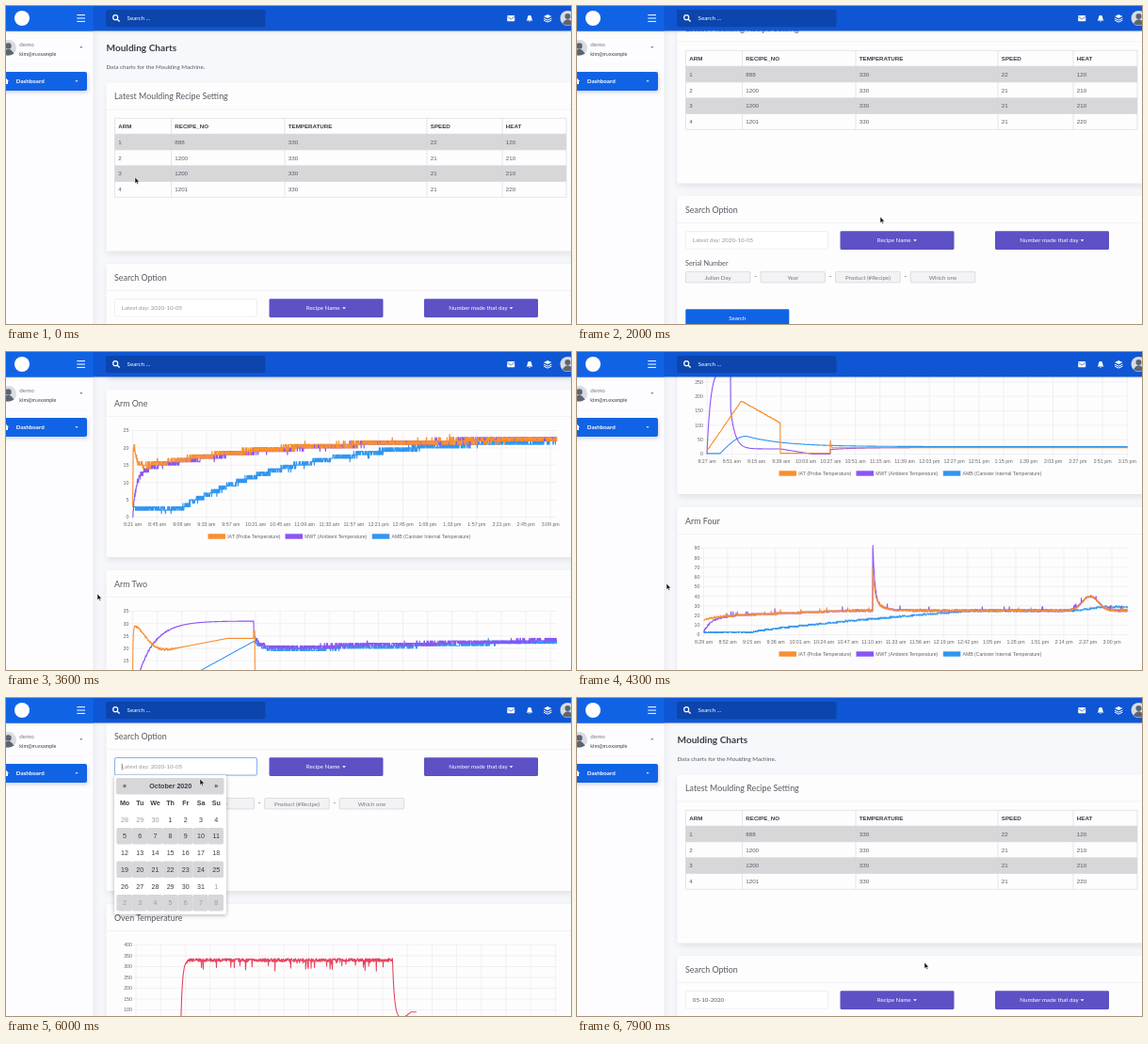
Animation of 600 by 338 pixels, one loop 8000 ms. Source, as an HTML page:

```html
<!DOCTYPE html>
<html lang="en">
<head>
<meta charset="utf-8">
<title>Moulding Charts</title>
<style>
html, body { margin: 0; width: 100%; height: 100%; overflow: hidden; background: #f7f8fb; }
svg { display: block; width: 600px; height: 338px; }
text { font-family: Lato, sans-serif; white-space: pre; }
.arial { font-family: "Liberation Sans", Arial, sans-serif; }
.bold { font-weight: 700; }
.mid { text-anchor: middle; }
.end { text-anchor: end; }
.card { fill: #fefdfe; filter: drop-shadow(1px 3px 3.5px rgba(69, 65, 78, .12)); }
.pop { fill: #fff; filter: drop-shadow(0 1px 2px rgba(0, 0, 0, .3)); }
.glow { filter: drop-shadow(1px 2px 2px rgba(69, 65, 78, .22)); }
.side { fill: #fdfcff; filter: drop-shadow(1px 1px 3px rgba(69, 65, 78, .1)); }
.bar { filter: drop-shadow(0 1px 1.5px rgba(0, 0, 0, .1)); }

#page, #cursor, .open, .blank, .picked { animation: 8s infinite; }
#page { animation-name: scroll; }
#cursor { animation-name: point; }
.open, .blank, .picked { animation-timing-function: step-end; }
.open { animation-name: open; }
.blank { animation-name: blank; }
.picked { animation-name: picked; }

/* One step per 100 ms */
@keyframes scroll {
  0% { transform: translateY(0); }
  16.25% { transform: translateY(0); animation-timing-function: steps(7); }
  25% { transform: translateY(-72px); animation-timing-function: steps(16); }
  45% { transform: translateY(-619px); animation-timing-function: steps(7); }
  53.75% { transform: translateY(-1070px); }
  57.5% { transform: translateY(-1070px); animation-timing-function: steps(8); }
  67.5% { transform: translateY(-248px); }
  82.5% { transform: translateY(-248px); animation-timing-function: steps(6); }
  90% { transform: translateY(-11px); animation-timing-function: steps(1); }
  91.25%, 100% { transform: translateY(0); }
}
@keyframes point {
  0%, 5% { transform: translate(137px, 182px); animation-timing-function: steps(9); }
  16.25% { transform: translate(322px, 224px); }
  25% { transform: translate(322px, 224px); animation-timing-function: steps(8); }
  35% { transform: translate(97px, 257px); }
  45% { transform: translate(97px, 257px); animation-timing-function: steps(7); }
  53.75% { transform: translate(95px, 246px); }
  57.5% { transform: translate(95px, 246px); animation-timing-function: steps(8); }
  67.5% { transform: translate(195px, 74px); }
  70% { transform: translate(195px, 74px); animation-timing-function: steps(4); }
  75% { transform: translate(206px, 86px); animation-timing-function: steps(4); }
  80% { transform: translate(126px, 147px); }
  81.25% { transform: translate(126px, 147px); animation-timing-function: steps(7); }
  90% { transform: translate(357px, 216px); animation-timing-function: steps(5); }
  96.25%, 100% { transform: translate(369px, 281px); }
}
@keyframes open {
  0% { visibility: hidden; }
  70% { visibility: visible; }
  81.25%, 100% { visibility: hidden; }
}
@keyframes blank {
  0% { visibility: visible; }
  81.25%, 100% { visibility: hidden; }
}
@keyframes picked {
  0% { visibility: hidden; }
  81.25%, 100% { visibility: visible; }
}
</style>
</head>
<body>
<svg viewBox="0 0 600 338">
  <g id="page"></g>
  <g id="frame"></g>
  <path id="cursor" d="M0 0V6.6L1.5 5.3L2.5 7.5L3.6 7L2.6 4.9H4.6Z" fill="#111" stroke="#fff" stroke-width=".5"/>
</svg>
<script>
const BLUE = '#1163e6', PURPLE = '#5d51c5', INK = '#575962', DARK = '#3a3c44', STRIPE = '#d7d6d9';
const ORANGE = '#f98f2f', VIOLET = '#8a55f5', SKY = '#3296ee', RED = '#e6455f';

let seed = 7;
const rnd = () => (seed = (seed * 16807) % 2147483647) / 2147483647;

// y is the middle of the capitals
const text = (x, y, str, size = 6.2, cls = '', fill = INK) =>
  `<text x="${x}" y="${y + size * .36}" font-size="${size}" class="${cls}" fill="${fill}">${str}</text>`;
const rect = (x, y, w, h, fill, extra = '') =>
  `<rect x="${x}" y="${y}" width="${w}" height="${h}" fill="${fill}" ${extra}/>`;
const line = (d, color = '#e6e5ea', w = .5, extra = '') =>
  `<path d="${d}" fill="none" stroke="${color}" stroke-width="${w}" ${extra}/>`;
const caret = (x, y, fill = '#fff', r = 1.9) => `<path d="M${x - r} ${y - r / 2}h${r * 2}l${-r} ${r}z" fill="${fill}"/>`;
const card = (y, h, title) =>
  `<rect class="card" x="106.5" y="${y}" width="498" height="${h}" rx="2"/>` +
  line(`M106.5 ${y + 28.5}H605`) + text(115, y + 14.5, title, 8.9);

function recipeTable() {
  const cols = [115.5, 175.5, 296, 447, 527, 595], top = 119.3, h = 16.8;
  const rows = [
    ['ARM', 'RECIPE_NO', 'TEMPERATURE', 'SPEED', 'HEAT'],
    [1, 888, 330, 22, 120], [2, 1200, 330, 21, 210],
    [3, 1200, 330, 21, 210], [4, 1201, 330, 21, 220]
  ];
  let out = '', grid = '';
  rows.forEach((row, r) => {
    const y = top + r * h;
    if (r % 2) out += rect(cols[0], y, 479.5, h, STRIPE);
    row.forEach((v, c) => out += text(cols[c] + 3.8, y + h / 2, v, 6.2, r ? 'arial' : 'arial bold', r ? INK : DARK));
  });
  for (let r = 0; r <= 5; r++) grid += `M115.5 ${top + r * h}H595`;
  cols.forEach(x => grid += `M${x} ${top}V${top + 5 * h}`);
  return out + line(grid, '#d5d4d9', .6);
}

function dropButton(x, label, mid, tip) {
  return rect(x, 311.3, 121, 19.6, PURPLE, 'rx="1.3"') + text(mid, 321.2, label, 6.2, 'mid', '#fff') + caret(tip, 321.2);
}

function searchForm() {
  let out = card(274, 179, 'Search Option') +
    rect(115.5, 311.5, 151, 18.6, '#fff', 'rx="1.5" stroke="#e4e4ea" stroke-width=".6"') +
    rect(115.5, 311.5, 151, 18.6, 'none', 'class="open" rx="1.5" stroke="#6f9fe8" stroke-width=".8"') +
    text(122.8, 321.2, 'Latest day: 2020-10-05', 6.2, 'blank', '#96969d') +
    line('M123.2 317.5V325', '#444', .5, 'class="open"') +
    text(122.8, 321.2, '05-10-2020', 6.2, 'picked') +
    dropButton(279.5, 'Recipe Name', 336.7, 359) +
    dropButton(444, 'Number made that day', 501.5, 536.5) +
    text(115, 345.2, 'Serial Number', 7.3);
  ['Julian Day', 'Year', 'Product (#Recipe)', 'Which one'].forEach((label, i) => {
    const x = 115.4 + i * 79.6;
    out += rect(x, 354.4, 68.6, 11.6, '#f3f2f4', 'rx="1" stroke="#cbcad0" stroke-width=".6"') +
      text(x + 34.3, 360.4, label, 6.2, 'mid', '#77777e');
    if (i) out += text(x - 5.5, 359.8, '-', 7, 'mid');
  });
  return out + rect(115.3, 394.3, 110, 19, BLUE, 'rx="1.3"') + text(170.3, 403.4, 'Search', 6.2, 'mid', '#fff');
}

function calendar() {
  const top = 330, pitch = 17.7, colX = c => 126 + c * 16.2;
  const head = (x, y, s) => text(x, top + y, s, 7.1, 'arial bold mid', DARK);
  let out = `<rect class="pop" x="115" y="${top}" width="119" height="148" rx="1.5"/>` +
    rect(117, top + 3, 114.5, 17.5, STRIPE, 'rx="1.8"') +
    head(126, 11.7, '«') + head(174.7, 11.7, 'October 2020') + head(223.2, 11.7, '»');
  ['Mo', 'Tu', 'We', 'Th', 'Fr', 'Sa', 'Su'].forEach((d, c) => out += head(colX(c), 29.4, d));
  for (let i = 0; i < 42; i++) {
    const r = Math.floor(i / 7), c = i % 7, n = i - 2;
    const y = top + 47.2 + r * pitch, inside = n > 0 && n < 32;
    if (r % 2) out += rect(colX(c) - 8.6, y - 8.8, 16.4, 17.5, STRIPE, 'rx="1.8"');
    out += text(colX(c), y, n < 1 ? n + 30 : n > 31 ? n - 31 : n, 7.1, 'arial mid', inside ? DARK : '#9b9ba1');
  }
  return `<g class="open">${out}</g>`;
}

// Curve parts over x: linear rise, decay after a point, approach to 1, bell
const ramp = (x, a, b) => Math.min(1, Math.max(0, (x - a) / (b - a)));
const fade = (x, a, tau) => x < a ? 0 : Math.exp((a - x) / tau);
const reach = (x, a, tau) => x < a ? 0 : 1 - fade(x, a, tau);
const bell = (x, mid, w) => Math.exp(-(((x - mid) / w) ** 2));

// Sensors flicker between whole degrees, with a rare jump
const flicker = (v, jump = 0) =>
  Math.floor(v + (rnd() - .5) * .4) + (rnd() < .5 ? 1 : 0) + (rnd() < .015 ? jump : 0);

function trace(color, left, right, f, yOf) {
  let d = '';
  for (let x = left; x <= right; x += .3) d += `${d ? 'L' : 'M'}${x.toFixed(1)} ${yOf(f(x)).toFixed(2)}`;
  return line(d, color, 1.1, 'stroke-linejoin="round"');
}

const clock = m => `${(Math.floor(m / 60) + 11) % 12 + 1}:${String(m % 60).padStart(2, '0')} ${m < 720 ? 'am' : 'pm'}`;
const armLegend = [
  [214.5, ORANGE, 'IAT (Probe Temperature)'],
  [296.5, VIOLET, 'MWT (Ambient Temperature)'],
  [388.8, SKY, 'AMB (Canister Internal Temperature)']
];

// Lines are listed from back to front as [colour, value at x, right end]
function chart({ title, left = 134.5, gap = 26.1, max, step, start, mins = 24, legend = armLegend, lines }, i) {
  const top = 467 + i * 192, base = top + 135.5, yOf = v => base - v / max * 92;
  let grid = '', out = card(top, 178, title);
  for (let v = 0; v <= max; v += step) {
    grid += `M${left - 3.5} ${yOf(v)}H585`;
    out += text(left - 4, yOf(v), v, 5.3, 'arial end', '#666');
  }
  for (let k = 0; k < 18; k++) {
    const x = left + k * gap;
    grid += `M${x} ${top + 43.5}V${base + 3.5}`;
    out += text(x, base + 7.8, clock(start + k * mins), 5.3, 'arial mid', '#666');
  }
  out += line(grid, '#e3e2e6', .5);
  lines.forEach(([color, f, right = 585]) => out += trace(color, left, right, f, yOf));
  legend.forEach(([x, c, label]) =>
    out += rect(x, top + 153.3, 18.5, 5.4, c) + text(x + 20.7, top + 156.1, label, 5.15, 'arial', '#666'));
  return out;
}

function ovenHeat(x) {
  if (x > 410.5) return 62 + 268 * fade(x, 410.5, 2) + 28 * ramp(x, 422, 430);
  const ripple = x > 192 ? (rnd() - .5) * 16 - (rnd() < .05 ? 45 * rnd() : 0) : 0;
  return 330 * reach(x, 185.5, 1.7) + ripple;
}

// Arm four: slow warm-up, one hot spike, one late hump
const warm = (x, spike) => 20 + 5 * ramp(x, 160, 290) + spike * fade(x, 314.2, 2) +
  12 * fade(x, 314.2, 9) + 15 * bell(x, 545, 12);

const charts = [
  {
    title: 'Oven Temperature', left: 138, gap: 26.2, max: 400, step: 50, start: 501,
    legend: [[325, RED, 'Oven Temperature']],
    lines: [[RED, ovenHeat, 436]]
  },
  {
    title: 'Arm One', max: 25, step: 5, start: 501,
    lines: [
      [SKY, x => flicker(2.6 + 20.4 * reach(x, 186, 130), -1)],
      [VIOLET, x => flicker(13.2 * reach(x, 134.5, 4) + 9.6 * reach(x, 134.5, 140), -1)],
      [ORANGE, x => flicker((14 + 9 * fade(x, 135, 3)) * reach(x, 134.4, .4) + 8.7 * reach(x, 134.5, 140), 1)]
    ]
  },
  {
    title: 'Arm Two', max: 35, step: 5, start: 504,
    lines: [
      [SKY, x => x < 264 ? 3 + 20 * ramp(x, 168, 264)
        : flicker(19.3 + 3.3 * ramp(x, 290, 560) + 3.5 * fade(x, 264, 8), 1)],
      [VIOLET, x => x < 263 ? 31 * reach(x, 134.5, 18) + (rnd() - .5) * ramp(x, 190, 150)
        : flicker(20.7 + 2.6 * ramp(x, 320, 585) + 6 * fade(x, 263, 4), 1)],
      [ORANGE, x => x > 264.3 ? 0 : x > 263 ? 27
        : (19.4 + 9.5 * bell(x, 136, 16) + 4.6 * ramp(x, 172, 235)) * reach(x, 134.4, .4) + (rnd() - .5) * ramp(x, 190, 170), 266]
    ]
  },
  {
    title: 'Arm Three', left: 138, gap: 26.25, max: 300, step: 50, start: 507,
    lines: [
      [SKY, x => x < 180 ? 2 + 60 * Math.sin(ramp(x, 152, 180) * Math.PI / 2) : 26 + 36 * fade(x, 180, 40)],
      [VIOLET, x => x < 163 ? 300 * reach(x, 138, 4)
        : x < 269 ? 18 * ramp(x, 250, 216) + 140 * fade(x, 163, 5) : 23 - 7 * fade(x, 269, 30)],
      [ORANGE, x => x > 269 ? 22 + 30 * fade(x, 269, .6) : x > 216 ? 3
        : 10 + 170 * ramp(x, 138, 174) - 74 * ramp(x, 176, 216) + rnd() * 3]
    ]
  },
  {
    title: 'Arm Four', gap: 25.5, max: 90, step: 10, start: 509, mins: 23,
    lines: [
      [SKY, x => flicker(2.5 + 22.5 * ramp(x, 185, 420) ** .8 + 4 * ramp(x, 530, 560))],
      [VIOLET, x => flicker(warm(x, 56) - 17 * fade(x, 134.5, 9), 4)],
      [ORANGE, x => flicker(warm(x, 32) - 5 * fade(x, 134.5, 12), 3)]
    ]
  }
];

const person = (x, y, r) =>
  `<circle cx="${x}" cy="${y}" r="${r}" fill="#d9dce1"/><circle cx="${x}" cy="${y - r * .25}" r="${r * .38}" fill="#5d6472"/>` +
  `<path d="M${x - r * .7} ${y + r * .7}q${r * .7} ${-r * 1.1} ${r * 1.4} 0q${-r * .7} ${r * .5} ${-r * 1.4} 0z" fill="#5d6472"/>`;

function topBar() {
  return `<g class="bar">${rect(0, 0, 600, 26.5, '#0f56d5') + rect(0, 0, 92.5, 26.5, BLUE)}</g>` +
    '<circle cx="17" cy="13" r="8" fill="#fff"/>' +
    line('M75.3 9.6H84M75.3 13H84M75.3 16.4H84', '#fff', 1) +
    rect(106, 4, 169.5, 18.3, '#0c45ac', 'rx="2"') +
    '<circle cx="116.2" cy="12.2" r="2.5" fill="none" stroke="#fff" stroke-width="1.2"/>' +
    line('M118 14L120.6 16.6', '#fff', 1.4) +
    text(128.5, 13.2, 'Search ...', 6.3, '', '#fff') +
    rect(532.2, 10, 8, 6.2, '#fff', 'rx=".8"') + line('M532.4 11.3L536.2 14L540 11.3', '#0f56d5', .7) +
    '<path d="M552.6 15.5q1.2-1 1.2-3.2q0-2.3 2.2-2.6q2.2.3 2.2 2.6q0 2.2 1.2 3.2zM555 16.2h2q-1 1.4-2 0z" fill="#fff"/>' +
    '<path d="M575.2 9l4.2 2l-4.2 2l-4.2-2z" fill="#fff"/>' +
    line('M571 13.1l4.2 2l4.2-2M571 15.1l4.2 2l4.2-2', '#fff', 1) +
    person(596.5, 13, 8);
}

function sideBar() {
  return '<rect class="side" x="-5" y="20" width="97.5" height="330"/>' +
    person(2.5, 44.5, 8.5) +
    text(14.3, 40.5, 'demo', 6.3, '', '#77777e') +
    text(14.3, 50.6, 'kim@m.example', 5.5, '', DARK) +
    caret(79.8, 44, INK, 1.5) + line('M0 61.7H86', '#f2f1f5') +
    `<g class="glow">${rect(-5, 70, 91, 20, BLUE, 'rx="2"')}</g>` +
    '<path d="M-4 80L0 76.8L3 80H2V83H-4z" fill="#fff"/>' +
    text(10.8, 80, 'Dashboard', 6.2, 'bold', '#fff') + caret(75, 80, '#fff', 1.6);
}

document.getElementById('page').innerHTML =
  text(106.5, 44.3, 'Moulding Charts', 10.1, 'bold', DARK) +
  text(106.5, 65, 'Data charts for the Moulding Machine.') +
  card(81.5, 179, 'Latest Moulding Recipe Setting') + recipeTable() +
  searchForm() + charts.map(chart).join('') + calendar();
document.getElementById('frame').innerHTML = sideBar() + topBar();
</script>
</body>
</html>
```
